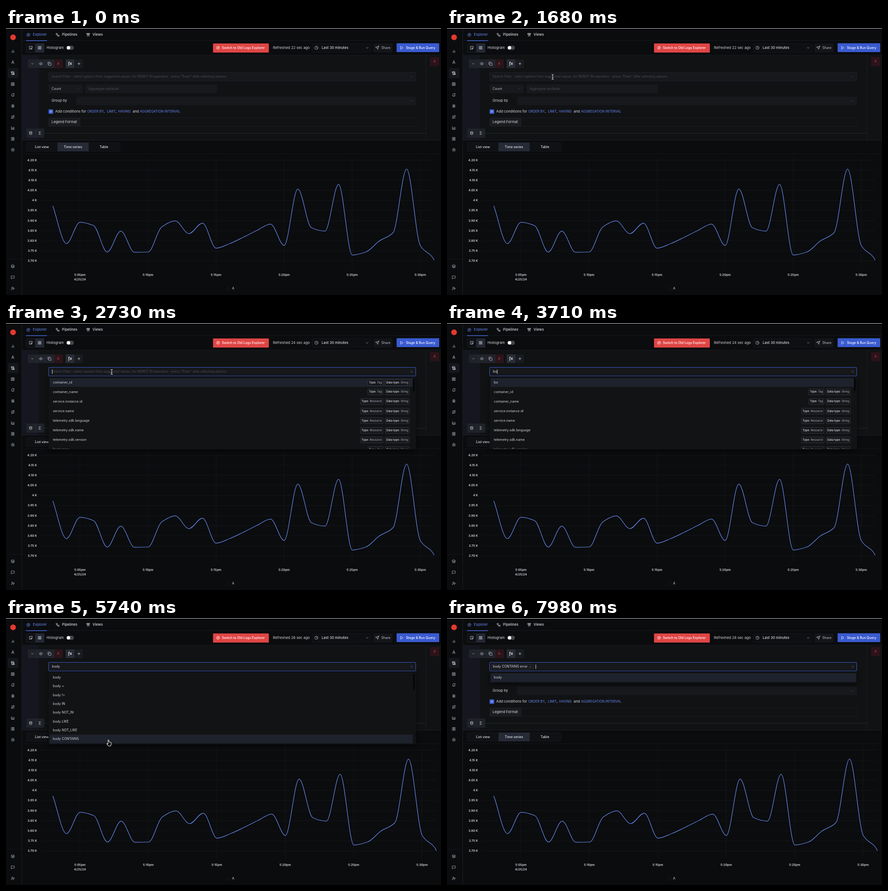
An HTML page with a canvas for the animation above (8000 ms loop, 955 by 587 pixels).

```html
<!DOCTYPE html>
<html lang="en">
<head>
<meta charset="utf-8">
<title>Logs explorer</title>
<style>
html, body { margin: 0; width: 100%; height: 100%; overflow: hidden; background: #0b0c0e; }
canvas { display: block; width: 955px; height: 587px; }
</style>
</head>
<body>
<canvas id="stage"></canvas>
<script>
const canvas = document.getElementById('stage'), c = canvas.getContext('2d');
const dpr = window.devicePixelRatio || 1;
canvas.width = 955 * dpr;
canvas.height = 587 * dpr;

const LOOP = 8000, SMALL = 7.28, BASE = 7.8;
const BLUE = '#4568dc', LINK = '#6688f0', LIGHT = '#d8dae0', DIM = '#484b52', EDGE = '#1b1e26';

// Icons live on a 24-unit grid.
const ICONS = {
  bars: 'M18 20V10M12 20V4M6 20v-6',
  compass: 'M12 8l7 13M12 8L5 21M4 14c5 4 11 4 16 0M14.5 5a2.5 2.5 0 1 1-5 0a2.5 2.5 0 1 1 5 0',
  scroll: 'M15 12h-5M15 8h-5M19 17V5a2 2 0 0 0-2-2H4M8 21h12a2 2 0 0 0 2-2v-2H11v2a3 2 0 0 1-6 0V5a2 2 0 0 0-3 0v3h3',
  grid: 'M3 3h7v7H3zM14 3h7v7h-7zM14 14h7v7h-7zM3 14h7v7H3z',
  bell: 'M6 8a6 6 0 0 1 8-5.6M18 11c0 4 3 6 3 6H3s3-2 3-9M10 21h4M18 2v6M21 5h-6',
  bug: 'M8 9a4 4 0 0 1 8 0v7a4 4 0 0 1-8 0zM8 2l2 3M16 2l-2 3M3 13h5M16 13h5M4 6l4 3M20 6l-4 3M4 21l4-4M20 21l-4-4M12 11v9',
  route: 'M9 19h8a3 3 0 0 0 0-7H7a3 3 0 0 1 0-7h8M9 19a3 3 0 1 1-6 0a3 3 0 1 1 6 0M21 5a3 3 0 1 1-6 0a3 3 0 1 1 6 0',
  area: 'M3 3v18h18M7 17v-5l4-4 4 4 5-5v10z',
  receipt: 'M4 3h16v18H4zM15 8h-5a2 2 0 0 0 0 4h4a2 2 0 0 1 0 4H9M12 6v12',
  gear: 'M12 2l3 3 4 0 0 4 3 3-3 3 0 4-4 0-3 3-3-3-4 0 0-4-3-3 3-3 0-4 4 0zM15 12a3 3 0 1 1-6 0a3 3 0 1 1 6 0',
  layers: 'M12 2l10 5-10 5L2 7zM2 12l10 5 10-5M2 17l10 5 10-5',
  message: 'M3 3h18v14H7l-4 4z',
  user: 'M2 21v-2a4 4 0 0 1 4-4h6a4 4 0 0 1 4 4v2M13 7a4 4 0 1 1-8 0a4 4 0 1 1 8 0M19 8v6M22 11h-6',
  needle: 'M22 12a10 10 0 1 1-20 0a10 10 0 1 1 20 0M16 8l-2 6-6 2 2-6z',
  flow: 'M3 3h7v7H3zM14 14h7v7h-7zM7 10v4a3 3 0 0 0 3 3h4',
  totem: 'M8 10l-1 12M16 10l1 12M9 15h6M3 3h18v6H3zM9 3v6M15 3v6',
  pick: 'M12 21H3V3h18v9M12 12l9 4-4 1-1 4z',
  clock: 'M22 12a10 10 0 1 1-20 0a10 10 0 1 1 20 0M12 6v6l4 2',
  send: 'M22 2L11 13M22 2l-7 20-4-9-9-4z',
  play: 'M5 3l15 9-15 9z',
  down: 'M5 9l7 7 7-7',
  eye: 'M1 12c5-10 17-10 22 0c-5 10-17 10-22 0M15 12a3 3 0 1 1-6 0a3 3 0 1 1 6 0',
  copy: 'M8 8h14v14H8zM4 16H2V2h14v2',
  plus: 'M12 4v16M4 12h16',
  data: 'M3 5a8 3 0 0 1 16 0a8 3 0 0 1-16 0v14a8 3 0 0 0 16 0V5M3 12a8 3 0 0 0 16 0',
  sigma: 'M18 7V4H6l6 8-6 8h12v-3',
  find: 'M18 11a7 7 0 1 1-14 0a7 7 0 1 1 14 0M16 16l6 6',
  cross: 'M6 6l12 12M18 6L6 18'
};
for (const name in ICONS) ICONS[name] = new Path2D(ICONS[name]);
const ARROW = new Path2D('M0 0V11.5L2.7 9 4.6 13 6.5 12 4.6 8.4H8.2Z');
const HAND = new Path2D('M-1 7V1a1 1 0 0 1 2 0V4.5l4 1q1 .4 1 1.6V9.5l-1.5 4H0L-3.5 9q-.4-2 2.5 0z');
const BEAM = new Path2D('M-2.5-5.5Q0-5.5 0-4Q0-5.5 2.5-5.5M0-4V4M-2.5 5.5Q0 5.5 0 4Q0 5.5 2.5 5.5M-1.5 1.5H1.5');

function text(s, x, y, color = LIGHT, size = SMALL, weight = 400, align = 'left') {
  c.font = `${weight} ${size}px Inter, sans-serif`;
  c.fillStyle = color;
  c.textAlign = align;
  c.textBaseline = 'middle';
  c.fillText(s, x, y);
  return c.measureText(s).width;
}
function box(x0, y0, x1, y1, fill, stroke, radius = 1) {
  c.beginPath();
  c.roundRect(x0, y0, x1 - x0, y1 - y0, radius);
  if (fill) { c.fillStyle = fill; c.fill(); }
  if (stroke) { c.strokeStyle = stroke; c.lineWidth = 1; c.stroke(); }
}
function rect(x0, y0, x1, y1, fill) {
  c.fillStyle = fill;
  c.fillRect(x0, y0, x1 - x0, y1 - y0);
}
function dot(x, y, r, fill) {
  c.beginPath();
  c.arc(x, y, r, 0, 7);
  c.fillStyle = fill;
  c.fill();
}
function icon(name, x, y, color = '#c3c6ce', size = 8.5) {
  c.save();
  c.translate(x - size / 2, y - size / 2);
  c.scale(size / 24, size / 24);
  c.strokeStyle = color;
  c.lineWidth = 2.2;
  c.lineCap = c.lineJoin = 'round';
  c.stroke(ICONS[name]);
  c.restore();
}

// Step track: value of the last entry that has started.
const at = (track, t) => track.reduce((v, e) => (e[0] <= t ? e : v));

function sidebar() {
  rect(34, 1, 35, 587, EDGE);
  rect(0, 508, 34, 509, '#15171c');
  box(4, 88, 27, 110, '#15171d', null, 2);
  dot(15.5, 20.5, 6.2, '#e5392f');
  ['bars', 'compass', 'scroll', 'grid', 'bell', 'bug', 'route', 'area', 'receipt', 'gear']
    .forEach((n, i) => icon(n, 15, 51 + i * 24.1, i === 2 ? '#fff' : '#b4b7c0'));
  ['layers', 'message', 'user'].forEach((n, i) => icon(n, 15, 524 + i * 24.3, '#b4b7c0'));
}

function header(t) {
  rect(35, 27, 955, 28, '#171a21');
  rect(44, 27, 90, 28.5, BLUE);
  icon('needle', 49, 15, LINK);
  text('Explorer', 59, 15, LINK, BASE);
  icon('flow', 113.5, 15, LIGHT);
  text('Pipelines', 123, 15, LIGHT, BASE, 500);
  icon('totem', 180.5, 15, LIGHT);
  text('Views', 190, 15, LIGHT, BASE, 500);

  box(44.5, 34.5, 83.5, 53.5, '#0f1114', EDGE);
  rect(64, 34, 84, 54, '#232833');
  icon('pick', 54.5, 43.5, LIGHT);
  icon('grid', 74, 43.5, LIGHT, 8);
  text('Histogram', 89, 43.5, LIGHT, BASE);
  box(132.5, 39, 149, 48, '#43464d', null, 4.5);
  dot(137.2, 43.5, 3.8, '#fff');

  box(454.5, 34, 577, 54, '#e04545');
  icon('needle', 465.5, 43.5, '#fff', 8);
  text('Switch to Old Logs Explorer', 474, 43.5, '#fff', 7.15, 500);
  const age = at([[0, 22], [2030, 24], [4130, 26], [6090, 28]], t)[1];
  text(`Refreshed ${age} sec ago`, 586, 43.5, '#d0d2d8', BASE);
  box(672.5, 34.5, 801.5, 53.5, '#0d0f12', '#14161b');
  icon('clock', 681.5, 43.5);
  text('Last 30 minutes', 693, 43.5, LIGHT, 7.7, 500);
  icon('down', 793, 43.5, LIGHT, 7);
  box(806.5, 34, 848.5, 54, '#131519');
  icon('send', 815, 43.5);
  text('Share', 824, 43.5, '#c3c6ce');
  box(857.5, 33.5, 951, 53, '#3a5bd0');
  icon('play', 869, 43.5, '#fff', 8);
  text('Stage & Run Query', 878, 43.5, '#fff', 7.15, 500);
}

function builder(t) {
  rect(35, 59, 955, 247, '#111214');
  rect(35, 59, 72, 247, '#15161f');
  rect(35, 59, 955, 60, '#15171c');
  rect(922, 60, 923, 247, '#1a1c21');
  rect(35, 246, 955, 247, EDGE);
  rect(84, 231, 922, 232, '#23262d');
  box(931, 64, 951, 84, '#2a1319');
  text('A', 941, 74, '#d2434f', SMALL, 400, 'center');

  box(48, 69, 125, 88, '#20232a');
  rect(105, 69, 125, 88, '#2a151b');
  for (const x of [67, 86, 105]) rect(x, 69, x + 0.6, 88, '#2b2f38');
  icon('down', 58, 78.5, LIGHT, 7);
  icon('eye', 76.5, 78.5);
  icon('copy', 95.5, 78.5);
  text('A', 114.5, 78.5, '#d2434f', SMALL, 400, 'center');
  box(131, 69, 169, 88, '#191b20');
  rect(131, 69, 150, 88, '#282c35');
  text('ƒx', 140.5, 78.5, '#fff', 8.5, 'italic 600'.slice(7), 'center');
  icon('plus', 160, 78.5, LIGHT, 8);

  box(93.5, 124, 168, 143, '#17191d');
  text('Count', 100, 133.5, '#c6c8ce');
  icon('down', 158, 133.5, '#555860', 6);
  box(174, 124, 463, 143, '#17191d');
  text('Aggregate attribute', 181, 133.5, DIM);
  text('Group by', 100, 160, LIGHT, BASE);
  box(154.5, 151, 900, 169.5, '#17191d');
  icon('down', 890, 160, '#555860', 6);

  box(93.5, 179, 103.5, 188.5, '#4264d8');
  icon('plus', 98.5, 183.7, '#dbe3ff', 7);
  text('Add conditions for', 108, 183.5, LIGHT, BASE);
  text('and', 278, 183.5, LIGHT, BASE);
  for (const [s, x, tail] of [['ORDER BY', 178.5, ','], ['LIMIT', 221.5, ','], ['HAVING', 246, ''], ['AGGREGATION INTERVAL', 294, '']])
    text(tail, x + text(s, x, 183.5, LINK, SMALL), 183.5, LIGHT, BASE);

  const legendHover = t > 6180 && t < 6420;
  box(93.5, 197.5, 900, 216.5, null, legendHover ? '#27324a' : '#191b20');
  rect(94, 198, 163.5, 216, '#1a1c20');
  text('Legend Format', 100, 207, LIGHT, BASE);

  box(44.5, 221, 84, 241, '#1f2228');
  rect(64, 221, 64.6, 241, '#2b2f38');
  icon('data', 54.5, 231, LIGHT, 8);
  icon('sigma', 74, 231, LIGHT, 8);
}

// Height in pixels for each minute from 5:03pm.
const HEIGHTS = [391, 474, 427, 434.5, 492.5, 446.5, 493, 492.5, 437.5, 424, 452, 429, 484, 474, 460, 445,
  431, 478, 354, 439, 446.5, 343.5, 499, 492.5, 468, 450, 310, 478, 509, 720];

function chart(t) {
  box(44.5, 252, 250, 271, '#0f1114', '#14161a');
  rect(113, 252, 181.5, 271, '#252a36');
  [['List view', 79], ['Time series', 147], ['Table', 215]]
    .forEach(([s, x]) => text(s, x, 261.5, '#e6e7eb', SMALL, 500, 'center'));
  rect(35, 276, 955, 277, '#15171c');

  const wide = t >= 3850, step = wide ? 30.04 : 29.88, right = wide ? 945 : 940;
  for (let i = 0; i <= 10; i++) {
    const y = 290.5 + i * 22.17, v = (4.2 - i * 0.05).toFixed(2);
    rect(77, y - 0.5, right, y + 0.5, '#14161a');
    text((v === '4.00' ? '4' : v) + ' K', 68, y, '#d4d6db', 6.65, 600, 'right');
  }
  for (let i = 0; i < 6; i++) {
    const x = 162.4 + i * 5 * step, m = 5 + i * 5;
    rect(x - 0.5, 284, x + 0.5, 527, '#14161a');
    text(`5:${String(m).padStart(2, '0')}pm`, x, 543, '#d4d6db', 6.65, 600, 'center');
  }
  text('4/25/24', 162.4, 553, '#d4d6db', 6.65, 600, 'center');

  // Monotone cubic through evenly spaced points.
  const h = HEIGHTS, d = h.slice(1).map((v, i) => v - h[i]);
  const slope = h.map((_, i) => {
    const a = d[i - 1] ?? d[i], b = d[i] ?? a;
    return a * b <= 0 ? 0 : 2 * a * b / (a + b);
  });
  c.save();
  c.beginPath();
  c.rect(77, 284, right - 77, 243);
  c.clip();
  c.beginPath();
  c.moveTo(102.7, h[0]);
  for (let i = 0; i < d.length; i++) {
    const x = 102.7 + i * step;
    c.bezierCurveTo(x + step / 3, h[i] + slope[i] / 3, x + step * 2 / 3, h[i + 1] - slope[i + 1] / 3, x + step, h[i + 1]);
  }
  c.strokeStyle = '#6488e8';
  c.lineWidth = 1.25;
  c.stroke();
  c.restore();

  c.beginPath();
  c.arc(488, 573, 3.1, 0, 7);
  c.lineWidth = 1.2;
  c.stroke();
  text('A', 496.3, 573, LIGHT, SMALL);
}

const FIELDS = ['container_id', 'container_name', 'service.instance.id', 'service.name', 'telemetry.sdk.language',
  'telemetry.sdk.name', 'telemetry.sdk.version', 'host.name'];
const OPERATORS = ['', ' =', ' !=', ' IN', ' NOT_IN', ' LIKE', ' NOT_LIKE', ' CONTAINS'].map(s => 'body' + s);
const CONTAINS = 'body CONTAINS ';
const TYPED = [[2440, ''], [3500, 'b'], [3570, 'bo'], [3850, 'bod'], [4180, 'body'], [5880, CONTAINS],
  [6720, CONTAINS + 'e'], [7070, CONTAINS + 'er'], [7210, CONTAINS + 'err'], [7490, CONTAINS + 'erro'],
  [7560, CONTAINS + 'error'], [7980, '']];

function tag(right, y, label, value) {
  c.font = '400 6px Inter, sans-serif';
  const w = c.measureText(value).width;
  c.font = '500 6px Inter, sans-serif';
  const left = right - w - c.measureText(label + ' ').width - 5;
  box(left, y - 6.5, right, y + 6.5, '#15171b', '#30343d');
  text(label, left + 2.5, y, '#e0e2e7', 6, 500);
  text(value, right - 2.5, y, '#b0b3ba', 6, 400, 'right');
  return left;
}

function search(t) {
  const [edited, value] = at(TYPED, t), tagged = t >= 7980;
  const glow = Math.min(1, Math.max(0, (t - 1790) / 100));
  box(93.5, 97.5, 899.5, 116.5, '#16181c', EDGE);
  c.globalAlpha = glow;
  box(93.5, 97.5, 899.5, 116.5, null, '#3d5ac2');
  c.globalAlpha = 1;
  if (t >= 2380) icon('find', 890.5, 107, '#5a5d64', 6);
  else icon('down', 890, 107, '#555860', 6);

  let x = 101;
  if (tagged) {
    box(97.5, 101.5, 189.5, 113, '#1a1c21', '#25282f');
    text('body CONTAINS error', 101, 107.3, LIGHT);
    icon('cross', 182.5, 107.5, '#777b84', 5);
    x = 194.5;
  } else if (value) x += text(value, x, 107.3, LIGHT);
  else text('Search Filter : select options from suggested values, for IN/NOT IN operators - press "Enter" after selecting options', 100, 107, DIM, 7.05);
  const blinkOn = Math.floor((t - edited) / 500) % 2 === 0;
  if (t >= 2440 && blinkOn) rect(x, 102.3, x + 0.9, 112, '#e8e9ec');
}

function dropdown(t) {
  if (t < 2480) return;
  const value = at(TYPED, t)[1];
  const single = t >= 5880, operators = !single && t >= 4130;
  let rows = operators ? OPERATORS : FIELDS;
  if (single) rows = [value || 'body'];
  else if (!operators && value) rows = [value, ...FIELDS];
  const step = operators ? 19.28 : 21.1, bottom = single ? 143 : 278;
  const rowY = i => 131 + i * step - (!operators && i ? 0.5 : 0);

  c.save();
  c.globalAlpha = Math.min(1, (t - 2480) / 100);
  c.shadowColor = 'rgba(0,0,0,.6)';
  c.shadowBlur = 10 * dpr;
  c.shadowOffsetY = 3 * dpr;
  box(93.5, 119, 900, bottom, '#121315', null, 2);
  c.shadowColor = 'transparent';
  c.beginPath();
  c.rect(94, 119, 806, bottom - 120.5);
  c.clip();
  const p = pointer(t);
  const active = operators && t >= 5180 ? Math.max(0, Math.min(7, Math.round((p.y - 131) / step))) : 0;
  const y = rowY(active);
  rect(96, y - 9.6, single ? 898 : 893, y + 9.6, '#1e222c');
  rows.forEach((s, i) => {
    text(s, 103, rowY(i), '#d4d6db');
    const field = FIELDS.indexOf(s);
    if (single || operators || field < 0) return;
    const left = tag(885.5, rowY(i), 'Data type:', 'String');
    tag(left - 5, rowY(i), 'Type:', field < 2 || field > 6 ? 'Tag' : 'Resource');
  });
  if (!single) box(893.5, 122, 897.5, operators ? 158 : 150, '#060708', null, 2);
  c.restore();
}

// Pointer keys: time, x, y.
const PATH = [[530, 391, 439], [1020, 218, 141], [1120, 218, 141], [1330, 222, 116], [1400, 225, 111], [1540, 232, 107.5],
  [5150, 232, 107.5], [5740, 225, 268], [6050, 225, 268], [6300, 229, 196], [6440, 249, 185], [LOOP, 249, 185]];

function pointer(t) {
  const i = Math.max(1, PATH.findIndex(k => k[0] > t));
  const [t0, x0, y0] = PATH[i - 1], [t1, x1, y1] = PATH[i];
  const u = Math.max(0, (t - t0) / (t1 - t0)), e = u * u * (3 - 2 * u);
  const shown = (t >= 560 && t < 3500) || (t >= 5180 && t < 6720);
  let shape = 'beam';
  if (t < 1400) shape = 'arrow';
  else if (t > 5220 && t < 6200) shape = 'hand';
  return { x: x0 + (x1 - x0) * e, y: y0 + (y1 - y0) * e, shape, shown };
}

function cursor(t) {
  const p = pointer(t);
  if (!p.shown) return;
  c.save();
  c.translate(p.x, p.y);
  c.lineJoin = 'round';
  if (p.shape === 'beam') {
    c.strokeStyle = '#000';
    c.lineWidth = 2.4;
    c.stroke(BEAM);
    c.strokeStyle = '#e4e5e8';
    c.lineWidth = 1.1;
    c.stroke(BEAM);
  } else {
    const path = p.shape === 'hand' ? HAND : ARROW;
    c.fillStyle = '#000';
    c.strokeStyle = '#eee';
    c.lineWidth = 1.1;
    c.fill(path);
    c.stroke(path);
  }
  c.restore();
}

function frame() {
  const t = performance.now() % LOOP;
  c.setTransform(dpr, 0, 0, dpr, 0, 0);
  rect(0, 0, 955, 587, '#0b0c0e');
  rect(0, 0, 955, 1, '#d4d5d6');
  sidebar();
  header(t);
  builder(t);
  chart(t);
  search(t);
  dropdown(t);
  cursor(t);
  requestAnimationFrame(frame);
}
frame();
</script>
</body>
</html>
```
